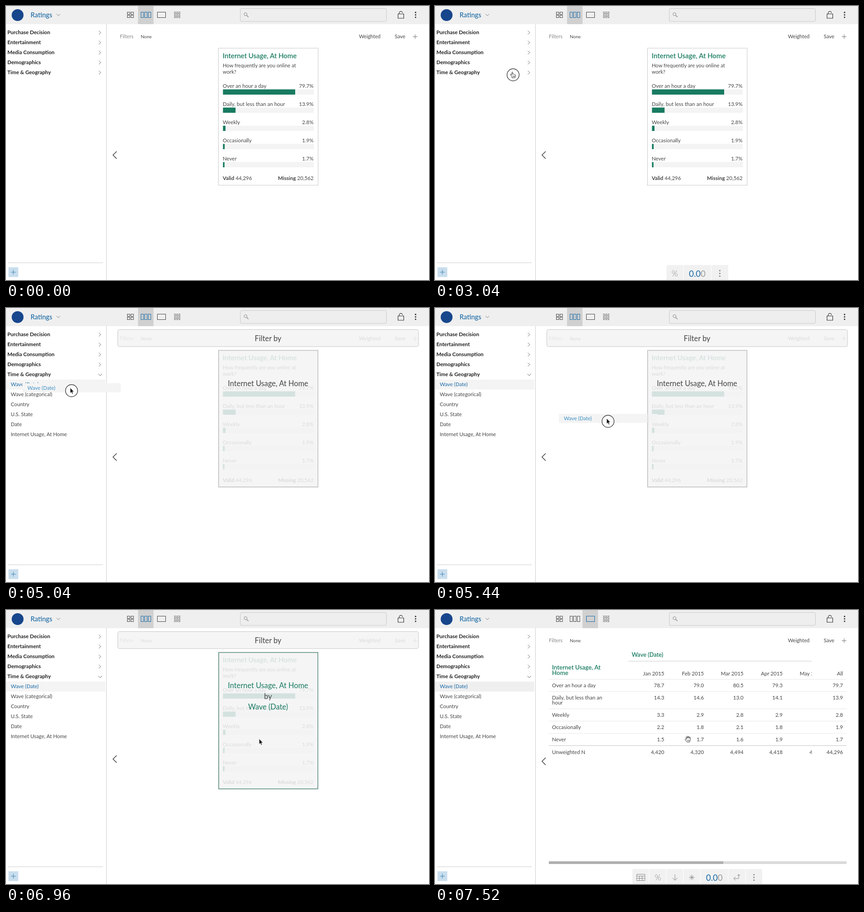
An HTML page that plays this animation: 929 px wide and 603 px high, repeating every 8 s.

```html
<!DOCTYPE html>
<html lang="en">
<head>
<meta charset="utf-8">
<title>Survey dashboard</title>
<style>
html, body { margin: 0; width: 100%; height: 100%; overflow: hidden; background: #fff; }
svg { display: block; width: 929px; height: 603px; font: 11.5px Lato, "Open Sans", sans-serif; }
</style>
</head>
<body>
<svg id="stage" viewBox="0 0 929 603"></svg>
<script>
const LOOP = 8000, STEP = 80;
const GREEN = '#187b61', BLUE = '#1a6aa6', INK = '#444', DARK = '#222';

// drawing helpers
const text = (x, y, s, o = {}) =>
  `<text x="${x}" y="${y}" fill="${o.fill || INK}" font-size="${o.size || 11.5}" ` +
  `font-weight="${o.weight || 400}" text-anchor="${o.anchor || 'start'}" ${o.more || ''}>${s}</text>`;
const rect = (x, y, w, h, fill, more = '') =>
  `<rect x="${x}" y="${y}" width="${w}" height="${h}" fill="${fill}" ${more}/>`;
const line = (d, color = '#555', width = 1, more = '') =>
  `<path d="${d}" fill="none" stroke="${color}" stroke-width="${width}" ${more}/>`;
const box = (x, y, w, h, color, fill = 'none') => rect(x, y, w, h, fill, `stroke="${color}"`);
const group = (id, body) => `<g id="${id}">${body}</g>`;
const dots = (x, y, gap, r, fill) =>
  [-1, 0, 1].map(i => `<circle cx="${x}" cy="${y + i * gap}" r="${r}" fill="${fill}"/>`).join('');
const right = { anchor: 'end' };

function header() {
  let s = rect(0, 0, 929, 40, '#efefef') + rect(290, 0, 34, 40, '#d0d0d0', 'id="tab"');
  s += '<circle cx="25.5" cy="20" r="13" fill="#17468c"/>';
  s += text(54, 24.5, 'Ratings', { fill: BLUE, size: 14.6, weight: 500 });
  s += line('M111 17.5l4 4 4-4', '#777');
  for (const x of [266.5, 274.5])
    for (const y of [13.5, 20.5]) s += box(x, y, 5.5, 5, '#444');
  s += group('columns', [296.5, 304.5, 312.5].map(x => rect(x, 13.5, 5.5, 12, 'none')).join(''));
  s += rect(332.5, 13.5, 18, 12, 'none', 'id="single"');
  for (let i = 0; i < 5; i++)
    s += line(`M369 ${13.5 + i * 3}h14`, '#444', 1, i % 2 ? '' : 'stroke-dasharray="4 1"');
  s += rect(514.5, 5.5, 321, 28.5, '#eee', 'rx="3" stroke="#c8c8c8"');
  s += '<circle cx="526" cy="18" r="3.3" fill="none" stroke="#888"/>' + line('M528.5 20.5l4 4', '#888', 1.4);
  s += line('M863.5 17.5v-2a3.7 3.7 0 0 1 7.4 0M861 17.5h12.5v9.5h-12.5z', '#333', 1.2);
  return s + dots(899.5, 19.5, 5.3, 1.6, '#333');
}

function sidebar() {
  let s = line('M220.5 40V603', '#ccc') + line('M4 565H213', '#ccc');
  ['Purchase Decision', 'Entertainment', 'Media Consumption', 'Demographics', 'Time &amp; Geography']
    .forEach((name, i) => {
      s += text(3, 62 + i * 22, name, { fill: DARK, weight: 700 });
      s += line(`M204 ${54.5 + i * 22}l4 4-4 4`, '#666', 1, i === 4 ? 'id="closed"' : '');
    });
  const items = ['Wave (Date)', 'Wave (categorical)', 'Country', 'U.S. State', 'Date', 'Internet Usage, At Home'];
  s += group('list', line('M203 145l4 4 4-4', '#666') +
    rect(0, 157.5, 218, 22, '#f4f4f4', 'id="hover"') +
    items.map((name, i) => text(10.5, 172 + i * 22, name, { size: 11.4, more: i ? '' : 'id="wave"' })).join(''));
  return s + rect(5.5, 575, 21.5, 21.5, '#c9deed') + line('M11 585.8h10.5M16.2 580.5v10.5', '#3a82b5');
}

function filters() {
  return text(250, 71, 'Filters', { fill: '#888', size: 11 }) + text(296, 70.5, 'None', { size: 10 }) +
    text(822.5, 71, 'Weighted', { size: 11.1, anchor: 'end' }) + text(877, 71, 'Save', { size: 11.4, anchor: 'end' }) +
    line('M893.5 67.5h10M898.5 62.5v10', '#777');
}

const answers = [
  ['Over an hour a day', 79.7], ['Daily, but less than an hour', 13.9],
  ['Weekly', 2.8], ['Occasionally', 1.9], ['Never', 1.7]
];

function card() {
  let s = box(466.5, 92.8, 219, 301.5, '#c8c8c8', '#fff');
  s += text(476, 114.5, 'Internet Usage, At Home', { fill: GREEN, size: 14.9, weight: 600 });
  s += text(476, 135, 'How frequently are you online at', { size: 11.2 }) + text(476, 149, 'work?', { size: 11.2 });
  answers.forEach(([name, share], i) => {
    const y = 180 + i * 40;
    s += text(476, y, name) + text(675.5, y, share + '%', right);
    s += rect(476.5, y + 3.5, 199.5, 11.5, '#f4f4f4') + rect(476.5, y + 3.5, share * 1.99, 11.5, GREEN);
  });
  return s + text(476, 383, '<tspan font-weight="700">Valid</tspan> 44,296') +
    text(675.5, 383, '<tspan font-weight="700">Missing</tspan> 20,562', right);
}

function overlay() {
  const mid = (y, s, more) => text(575.5, y, s, { size: 16.3, anchor: 'middle', more });
  return rect(245.5, 47.5, 660.5, 37.5, '#f4f4f4', 'rx="4" fill-opacity=".86"') +
    rect(245.5, 47.5, 660.5, 37.5, 'none', 'rx="4" stroke="#c6c6c6"') +
    rect(467, 93.3, 218, 300.5, '#f4f4f4', 'fill-opacity=".86"') +
    rect(467.3, 93.7, 217.5, 299.8, 'none', 'id="frame"') +
    mid(73, 'Filter by') + mid(172, 'Internet Usage, At Home', 'id="target"') +
    group('pair', mid(195.5, 'by') +
      text(575.5, 219, 'Wave (Date)', { size: 16.3, anchor: 'middle', fill: GREEN }));
}

function table() {
  const head = { fill: GREEN, size: 12.8, weight: 600 }, rowHead = { ...head, size: 13.4 };
  const edges = [503.5, 590.5, 677.5, 763.5];
  const rows = [
    [143.5, '', 'Jan 2015', 'Feb 2015', 'Mar 2015', 'Apr 2015', 'All'],
    [170, 'Over an hour a day', '78.7', '79.0', '80.5', '79.3', '79.7'],
    [197, 'Daily, but less than an', '14.3', '14.6', '13.0', '14.1', '13.9'],
    [235, 'Weekly', '3.3', '2.9', '2.8', '2.9', '2.8'],
    [262, 'Occasionally', '2.2', '1.8', '2.1', '1.8', '1.9'],
    [289, 'Never', '1.5', '1.7', '1.6', '1.9', '1.7'],
    [316.5, 'Unweighted N', '4,420', '4,320', '4,494', '4,418', '44,296']
  ];
  let s = text(432, 103, 'Wave (Date)', head) + line('M425 112.5H827', '#ccc');
  s += text(257, 130.5, 'Internet Usage, At', rowHead) + text(257, 143, 'Home', rowHead);
  for (const [y, name, ...cells] of rows) {
    s += text(257, y, name);
    cells.forEach((v, i) => s += text(edges[i] || 896, y, v, right));
  }
  s += text(257, 208, 'hour');
  s += '<clipPath id="cut"><path d="M770 90h57.5v240h-57.5z"/></clipPath><g clip-path="url(#cut)">' +
    text(801, 143.5, 'May 2015') + text(822.5, 316.5, '4,405') + '</g>';
  for (const y of [152.5, 179.5, 217.5, 244.5, 271.5]) s += line(`M250 ${y}H904`, '#e8e8e8');
  s += line('M250 298.5H904', '#c4c4c4');
  return s + rect(250, 553, 654, 6, '#dadada') + rect(250, 553, 383, 6, '#b0b0b0');
}

// bottom toolbars
const bar = (x, end, cuts) => rect(x, 570, end - x, 33, '#f1f1f1') +
  cuts.map(c => line(`M${c} 570v33`, '#fff')).join('');
const percent = x => text(x, 595, '%', { size: 18, weight: 300, fill: '#888', anchor: 'middle' });
const decimals = x => text(x, 596, '0.0<tspan fill="#999">0</tspan>', { size: 18.4, fill: BLUE, anchor: 'middle' });

const cardBar = () => bar(508.5, 644, [545.5, 607]) + percent(526.5) + decimals(576) + dots(625.5, 588.5, 6, 1.6, '#888');
const tableBar = () => bar(433.5, 718.5, [470.5, 508, 545.5, 583, 644, 682]) +
  line('M443 581.5h18v14h-18zM443 585.5h18M443 590.5h18M449 585.5v10M455 585.5v10', '#888') +
  percent(489.5) + line('M527 582v13M521.5 589.5l5.5 5.5 5.5-5.5', '#888') +
  line('M564 582.5v12M558 588.5h12M560 584.5l8 8M568 584.5l-8 8', '#888') +
  decimals(613.5) + line('M667 582v9h-11M660 587l-4 4 4 4M664 585l3-3.5 3 3.5', '#888') +
  dots(700.5, 588.5, 6, 1.6, '#888');

function cursor() {
  const ink = 'fill="#fff" stroke="#333" stroke-linejoin="round"';
  return '<circle id="press" r="13.3" fill="#fff" fill-opacity=".6" stroke="#222" stroke-width="1.2"/>' +
    '<path id="arrow" d="M-3-6.5V5.5L-.4 3 1.5 7.2 3.4 6.3 1.6 2.3H5.2Z" fill="#111" stroke="#fff" stroke-width=".7"/>' +
    `<g id="point" ${ink}><path d="M-2.5 6.5V4.5L-6-.3C-6.5-1.7-4.8-2-4-1L-2.7.6V-5.2C-2.6-6.7-.8-6.7-.7-5.2V-1.5C0-2.4 1.3-2 1.5-1 2.4-1.7 3.5-1.2 3.7-.3 4.8-.8 5.7 0 5.6 1.2 5.5 3 4.7 4 4.4 6.5Z"/><path d="M-.3 2v2.5M1.5 2v2.5M3.2 2v2.5"/></g>` +
    `<g id="grab" ${ink}><path d="M-2.5 6.5L-6 1C-6.5-.3-5-.9-4-.1L-3 .8-4.3-3.6C-4.5-5-2.9-5.4-2.4-4L-1.5-1.7V-5.3C-1.3-6.8.3-6.7.5-5.3L.7-1.9 1.6-5C2-6.2 3.5-5.8 3.3-4.5L2.9-1.3 4-3C4.8-4 6-3.3 5.6-2.2L5 2.2 3.7 6.5Z"/><path d="M-1 2v2M1 2v2M2.8 2v2"/></g>`;
}

document.getElementById('stage').innerHTML =
  header() + sidebar() + line('M243 320l-8 8 8 8', '#333', 1.4, 'id="back"') + filters() +
  group('card', card()) + group('table', table()) +
  group('drag', rect(0, 0, 216, 20, '#f4f4f4') + text(11, 14, 'Wave (Date)', { fill: '#3a8fc4', size: 11.4 })) +
  group('overlay', overlay()) + group('cardBar', cardBar()) + group('tableBar', tableBar()) +
  group('cursor', cursor());

const $ = id => document.getElementById(id);
const show = (id, on) => $(id).setAttribute('visibility', on ? 'inherit' : 'hidden');
const set = (id, attrs) => { for (const k in attrs) $(id).setAttribute(k, attrs[k]); };
const ramp = (t, a, b) => Math.min(1, Math.max(0, (t - a) / (b - a)));
const within = (t, a, b) => t >= a && t < b;

// pointer path: time, x, y
const path = [
  [880, 218, 410], [1200, 183.5, 321], [1440, 145, 205], [1600, 165, 156], [1680, 172.5, 151.5],
  [2960, 172.5, 151.5], [3040, 171.5, 151.5], [3520, 171.5, 151.5], [3840, 125, 158],
  [4160, 99.5, 165.5], [4480, 98.5, 168], [4960, 98.5, 167.5], [5040, 144, 182],
  [5440, 380, 249.5], [5840, 537, 278.5], [6000, 565, 287], [6240, 559, 290],
  [7360, 559, 290], [7440, 555.5, 284]
];

function pointer(t) {
  const i = path.findIndex(p => p[0] > t);
  if (i < 0) return path[path.length - 1].slice(1);
  if (i === 0) return path[0].slice(1);
  const [a, b] = [path[i - 1], path[i]], k = ramp(t, a[0], b[0]);
  return [a[1] + (b[1] - a[1]) * k, a[2] + (b[2] - a[2]) * k];
}

function draw(t) {
  const [x, y] = pointer(t);
  const dragging = within(t, 5040, 6960), tableView = t >= 7040, loaded = t >= 7440;
  const open = t >= 3200, hovered = within(t, 4000, 7040) || loaded, onCard = t >= 5760;

  set('tab', { x: tableView ? 324 : 290 });
  set('columns', { stroke: tableView ? '#444' : BLUE });
  set('single', { stroke: tableView ? BLUE : '#444' });
  set('back', { transform: `translate(0 ${tableView ? 5 : 0})` });

  show('closed', !open);
  show('list', open);
  show('hover', open && hovered);
  set('hover', { fill: loaded ? '#efefef' : '#f4f4f4' });
  set('wave', { fill: hovered ? BLUE : INK });

  show('card', !tableView);
  show('table', loaded);
  show('overlay', within(t, 5040, 7040));
  show('pair', within(t, 5040, 7040) && onCard);
  set('target', { fill: onCard ? GREEN : INK });
  set('frame', { stroke: onCard ? '#2a7561' : '#c0c0c0' });
  show('drag', dragging);
  set('drag', { transform: `translate(${x - 108} ${y - 16.5})` });

  set('cardBar', { opacity: ramp(t, 800, 1120) * (1 - ramp(t, 3120, 3360)) });
  set('tableBar', { opacity: ramp(t, 7360, 7520) });

  const hand = within(t, 1760, 4000), grab = within(t, 4000, 5040) || loaded;
  show('cursor', t >= 880);
  set('cursor', { transform: `translate(${x} ${y})` });
  show('press', within(t, 2080, 2240) || within(t, 3040, 3200) || within(t, 4720, 6960));
  show('point', t >= 880 && hand);
  show('grab', t >= 880 && grab);
  show('arrow', t >= 880 && !hand && !grab);
}

const start = performance.now();
function tick() {
  const t = (performance.now() - start) % LOOP;
  draw(Math.floor(t / STEP) * STEP);
  requestAnimationFrame(tick);
}
tick();
</script>
</body>
</html>
```
